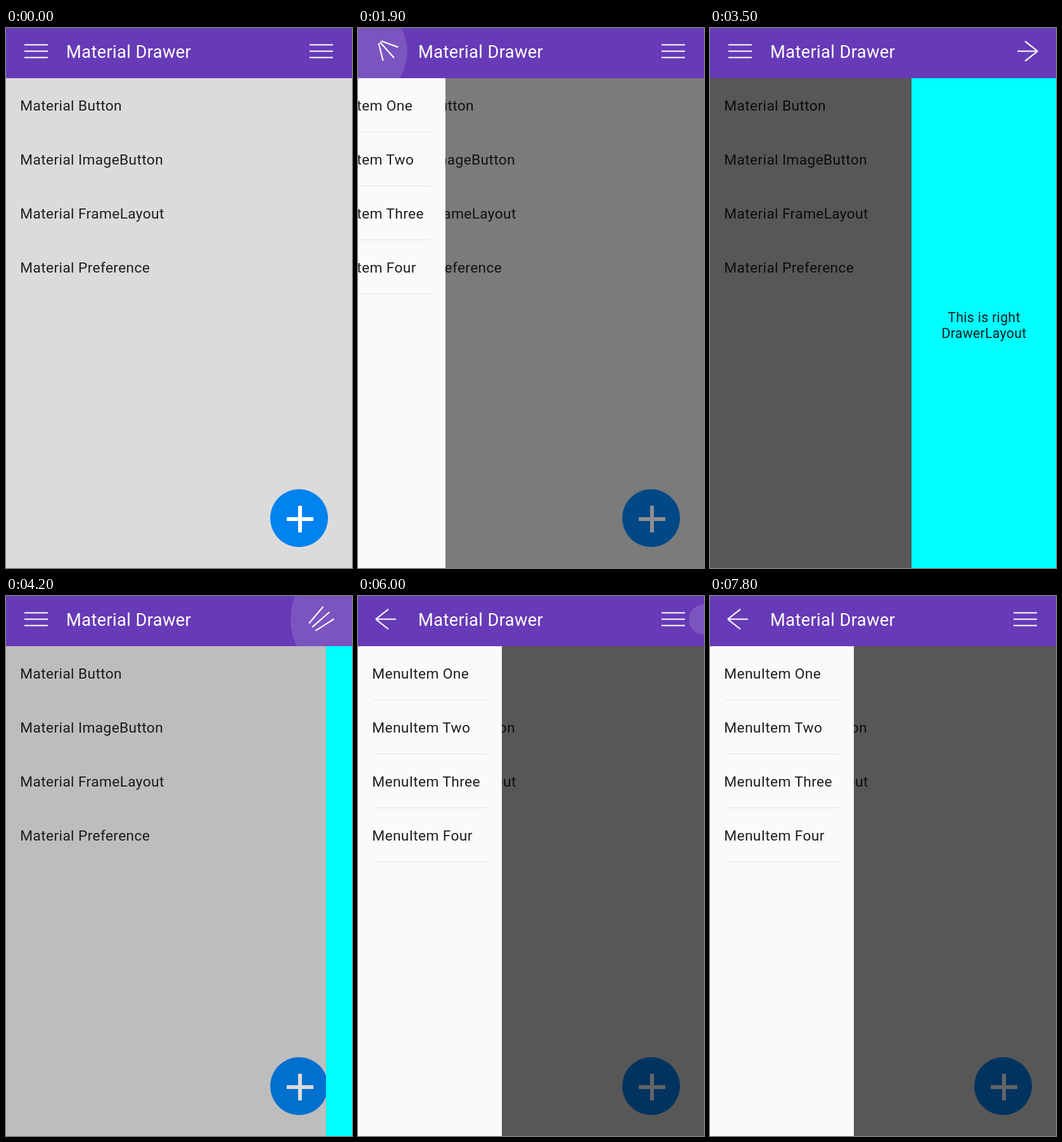
Animation, 546 px wide and 850 px high, one loop 8 s. Source, as an HTML page:

```html
<!DOCTYPE html>
<html lang="en">
<head>
<meta charset="utf-8">
<title>Material Drawer</title>
<style>
  html, body { margin: 0; width: 100%; height: 100%; overflow: hidden; background: #dbdbdb; }
  svg { display: block; }
  text { font: 22.75px Roboto, sans-serif; letter-spacing: .35px; fill: #1f1f1f; white-space: pre; }
  .title { font-size: 27.3px; fill: #fff; }
  .note { font-size: 21.2px; text-anchor: middle; fill: #101c1c; }
  .icon { fill: none; stroke: #fff; stroke-width: 2.2; }
</style>
</head>
<body>
<svg width="546" height="850" viewBox="0 0 546 850">
  <clipPath id="barClip"><rect width="546" height="79"/></clipPath>
  <rect width="546" height="850" fill="#dbdbdb"/>
  <g id="content"></g>
  <circle cx="462.5" cy="771.5" r="45.5" fill="#0082ef"/>
  <path d="M443 773H485M464 752V794" stroke="#fff" stroke-width="6"/>
  <rect id="scrim" y="79" width="546" height="771"/>
  <g id="leftDrawer"><rect y="79" width="227" height="771" fill="#fafafa"/></g>
  <g id="rightDrawer">
    <rect x="318" y="79" width="228" height="771" fill="#0ff"/>
    <text class="note" x="432.5" y="462.5">This is right</text>
    <text class="note" x="432.5" y="487.5">DrawerLayout</text>
  </g>
  <rect width="546" height="79" fill="#673ab7"/>
  <circle id="ripple" cy="37" fill="#fff" clip-path="url(#barClip)"/>
  <path id="leftIcon" class="icon"/>
  <path id="rightIcon" class="icon"/>
  <text class="title" x="95" y="47">Material Drawer</text>
</svg>
<script>
const $ = id => document.getElementById(id);
const lerp = (a, b, k) => a + (b - a) * k;
const clamp = k => Math.max(0, Math.min(1, k));

const LOOP = 8000, STEP = 100;
// Each tap: time, tapped side, delay until the drawers move, and how open they end up.
const taps = [
  { at: 800,  x: 0,   delay: 51, left: 1, right: 0 },
  { at: 1800, x: 0,   delay: 50, left: 0, right: 0 },
  { at: 3100, x: 546, delay: 30, left: 0, right: 1 },
  { at: 4000, x: 546, delay: 47, left: 0, right: 0 },
  { at: 4900, x: 0,   delay: 50, left: 1, right: 0 },
  { at: 6000, x: 546, delay: 90, left: 0, right: 1 },
  { at: 7300, x: 0,   delay: 65, left: 1, right: 0 }
];
const closed = { left: 0, right: 0 };

function fillList(parent, labels, divided) {
  labels.forEach((label, i) => {
    const y = 130 + 85 * i;
    parent.innerHTML += `<text x="22.3" y="${y}">${label}</text>` +
      (divided ? `<rect x="24" y="${y + 33}" width="179" height="1" fill="#e4e4e4"/>` : '');
  });
}
fillList($('content'), ['Button', 'ImageButton', 'FrameLayout', 'Preference'].map(s => 'Material ' + s));
fillList($('leftDrawer'), ['One', 'Two', 'Three', 'Four'].map(s => 'MenuItem ' + s), true);

const settle = u => 1 - (1 - clamp(u)) ** 5;

// Three bars (k = 0) turn half a circle into an arrow (k = 1).
function drawIcon(icon, cx, k, turn, flip) {
  const start = lerp(-18.5, -19.5, k), gap = lerp(10, 0, k);
  const length = lerp(37, 25.3, k), angle = lerp(0, 0.665, k);
  const dx = length * Math.cos(angle), dy = length * Math.sin(angle);
  icon.setAttribute('d', `M${start} 0H${lerp(18.5, 12.5, k)}` +
    `M${start} ${-gap}l${dx} ${-dy}M${start} ${gap}l${dx} ${dy}`);
  icon.setAttribute('transform',
    `translate(${cx} 36.5) rotate(${turn * 180 * (1 - k)}) scale(${flip ? -1 : 1} 1)`);
}

function drawRipple(tap, s) {
  const radius = s < 0 ? 32 + 0.09 * s : 32 + 65 * (1 - (1 - clamp(s / 150)) ** 3);
  const ripple = $('ripple');
  ripple.setAttribute('cx', tap.x);
  ripple.setAttribute('r', radius);
  ripple.setAttribute('opacity', 0.13 * (1 - clamp((s - 150) / 220)));
}

function render(time) {
  const t = Math.floor(time % LOOP / STEP) * STEP;
  const index = taps.findLastIndex(tap => tap.at <= t);
  const tap = taps[index] || { at: -1000, x: 0, delay: 0, ...closed };
  const from = taps[index - 1] || closed;
  const s = t - tap.at - tap.delay;
  const u = s * 0.0019, done = u >= 0.7;
  const slide = done ? 1 : settle(u);
  const follow = done ? 1 : settle(u - 0.035); // scrim and icons trail slightly

  const at = (side, k) => lerp(from[side], tap[side], k);
  const turn = side => tap[side] > from[side] ? -1 : 1;
  const left = at('left', follow), right = at('right', follow);

  $('leftDrawer').setAttribute('transform', `translate(${Math.round(-227 * (1 - at('left', slide)))} 0)`);
  $('rightDrawer').setAttribute('transform', `translate(${Math.round(228 * (1 - at('right', slide)))} 0)`);
  $('scrim').setAttribute('opacity', 0.6 * Math.max(left, right));
  drawIcon($('leftIcon'), 47.5, left, turn('left'), false);
  drawIcon($('rightIcon'), 497.5, right, turn('right'), true);
  drawRipple(tap, s);
}

const begin = performance.now();
function frame() {
  render(performance.now() - begin);
  requestAnimationFrame(frame);
}
frame();
</script>
</body>
</html>
```
